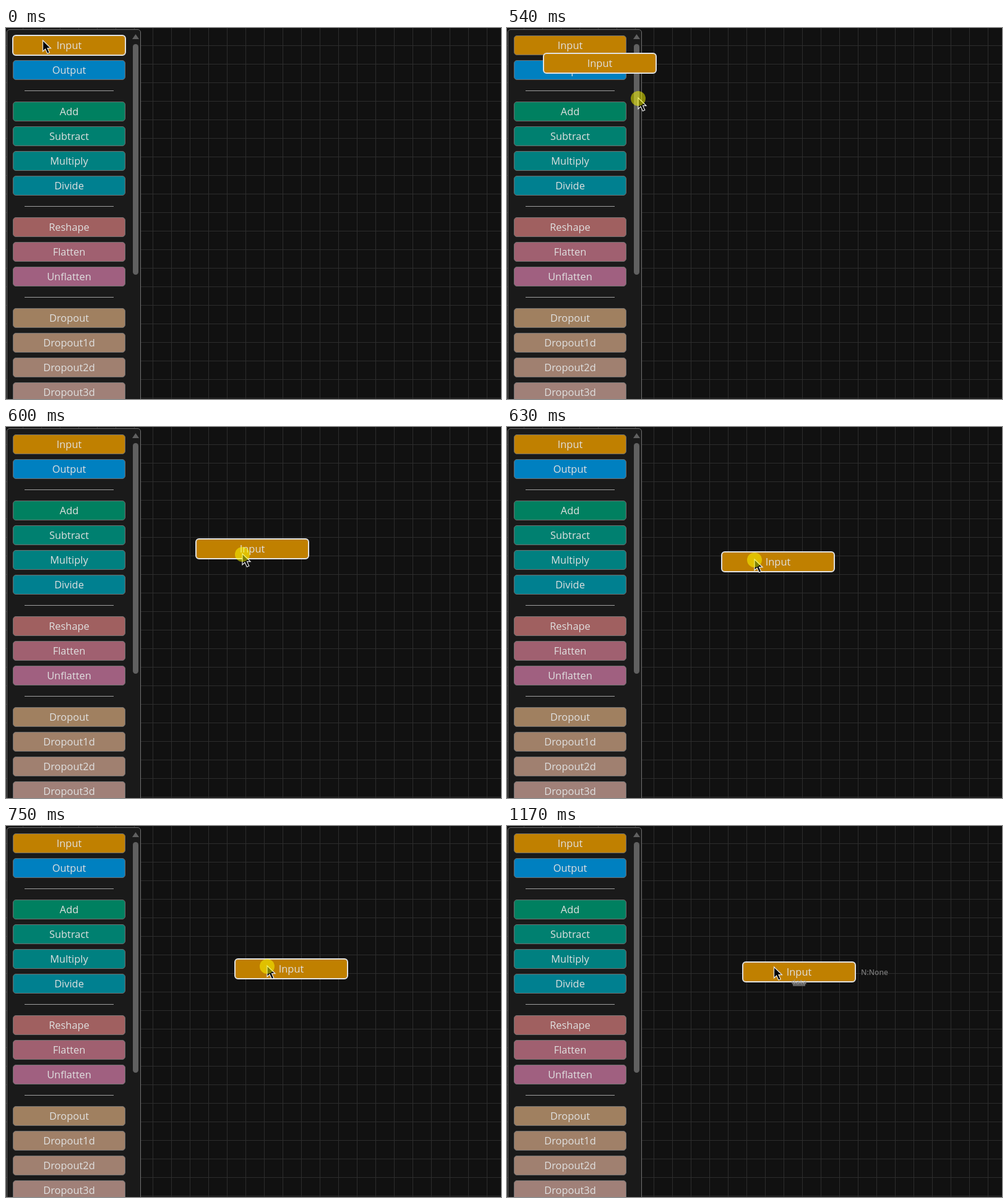
These frames come from a looping animation (800 by 600 pixels, 1830 ms). An HTML page:

```html
<!DOCTYPE html>
<html lang="en">
<head>
<meta charset="utf-8">
<title>Drag a node</title>
<style>
  * { box-sizing: border-box; }
  html, body { margin: 0; width: 100%; height: 100%; overflow: hidden; background: #111; }
  #stage {
    position: relative; width: 800px; height: 600px; overflow: hidden;
    font: 16.4px/32px "Open Sans", "Noto Sans", sans-serif; color: #e0e0e0;
    background:
      linear-gradient(90deg, #2d2d2d 1px, transparent 1px) 27px 0 / 30px 30px,
      linear-gradient(#2d2d2d 1px, transparent 1px) 0 28px / 30px 30px, #111;
  }
  #stage > *, #panel > * { position: absolute; }
  #panel {
    left: 1px; top: 2px; width: 217px; height: 620px;
    border: 1px solid #707070; border-radius: 5px; background: #1a1a1a;
  }
  .node {
    left: 9px; width: 182px; height: 32px; line-height: 30px; text-align: center;
    border: 1px solid #707070; border-radius: 5px;
  }
  .rule { left: 28px; width: 144px; height: 1px; background: #a0a0a0; }
  #thumb { left: 203px; top: 23px; width: 9px; height: 373px; border-radius: 4.5px; background: #606060; }
  #up {
    left: 202px; top: 7px; width: 11px; height: 8px;
    background: #606060; clip-path: polygon(50% 0, 100% 100%, 0 100%);
  }
  #drag {
    left: 0; top: 0; width: 184px; height: 34px; border: 2px solid #e0e0e0;
    border-radius: 6px; background: #c08000;
  }
  #port { left: 462px; top: 249px; width: 20px; height: 10px; background: #606060; }
  .note { font-size: 12px; font-weight: 600; line-height: 16px; white-space: nowrap; }
  #shape { left: 572px; top: 229px; color: #747474; }
  #data { left: 442px; top: 244px; width: 60px; text-align: center; font-size: 11.5px; color: rgba(160, 160, 160, .75); }
  #pointer { left: 0; top: 0; overflow: visible; }
</style>
</head>
<body>
<div id="stage">
  <div id="panel"><div id="up"></div><div id="thumb"></div></div>
  <div id="port" class="done"></div>
  <div id="drag" class="node">Input</div>
  <div id="shape" class="note done">N:None</div>
  <div id="data" class="note done">data</div>
  <svg id="pointer" width="1" height="1">
    <path d="M0 0V17.8L4.1 14L7.4 21.3L10.8 19.8L7.5 12.7H13Z" fill="#000" stroke="#e8e8e8" stroke-width="1.2"/>
    <circle id="press" r="12" fill="#ff0" fill-opacity=".5"/>
  </svg>
</div>
<script>
  const LOOP = 1830, PRESS = 480, STEP = 30, DROP = 1170;

  // Each group of [label, colour] pairs is followed by a rule.
  const groups = [
    [["Input", "#c08000"], ["Output", "#0080c0"]],
    [["Add", "#008060"], ["Subtract", "#008070"], ["Multiply", "#008080"], ["Divide", "#008090"]],
    [["Reshape", "#a06060"], ["Flatten", "#a06070"], ["Unflatten", "#a06080"]],
    [["Dropout", "#a08060"], ["Dropout1d", "#a08068"], ["Dropout2d", "#a08070"], ["Dropout3d", "#a08078"]]
  ];

  // Pointer x, y and node x, y for every step of the drag.
  const path = [
    [66, 28, 10, 11], [112, 54, 12, 14], [212, 114, 58, 40], [347, 188, 147, 95],
    [382, 206, 306, 180], [400, 215, 346, 201], [408, 219, 354, 206], [413, 222, 359, 209],
    [418, 225, 364, 212], [422, 227, 369, 214], [426, 228, 373, 216], [428, 229, 377, 218],
    [430, 230, 380, 219]
  ];

  const $ = id => document.getElementById(id);
  const done = document.querySelectorAll(".done");

  function add(className, top, colour, label = "") {
    const el = document.createElement("div");
    el.className = className;
    el.style.top = top + "px";
    el.style.background = colour;
    el.textContent = label;
    $("panel").append(el);
  }

  let y = 9;
  for (const group of groups) {
    for (const [label, colour] of group) {
      add("node", y, colour, label);
      y += 40;
    }
    add("rule", y + 9, "#a0a0a0");
    y += 27;
  }

  const place = (el, x, y) => { el.style.transform = `translate(${x}px, ${y}px)`; };

  function draw(t) {
    const step = Math.min(path.length - 1, Math.max(0, Math.floor((t - PRESS) / STEP)));
    const [px, py, nx, ny] = path[step];
    const dropped = t >= DROP;
    const pressed = t >= PRESS && !dropped;
    place($("drag"), nx, ny);
    if (pressed) place($("pointer"), px, py - 1);
    else if (dropped) place($("pointer"), 431.5, 228);
    else place($("pointer"), 59.5, 20);
    $("press").style.display = pressed ? "" : "none";
    $("press").setAttribute("cy", 1);
    for (const el of done) el.style.visibility = dropped ? "visible" : "hidden";
  }

  const start = performance.now();
  function tick() {
    draw((performance.now() - start) % LOOP);
    requestAnimationFrame(tick);
  }
  tick();
</script>
</body>
</html>
```
